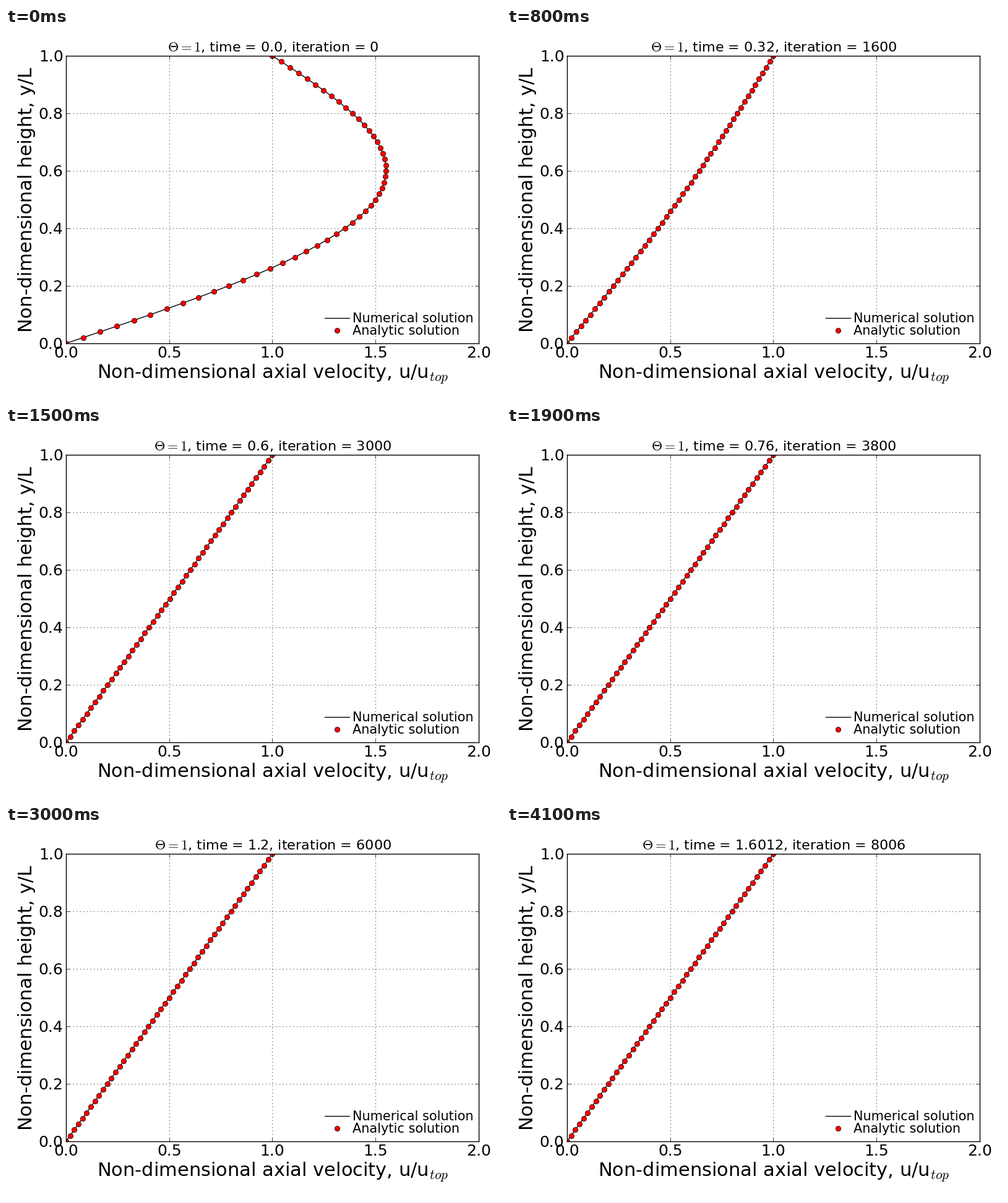
Animation, 800 px wide and 600 px high, one loop 4200 ms. Source, as a matplotlib script:

```python
import numpy as np
import matplotlib.pyplot as plt
from matplotlib.animation import FuncAnimation
from matplotlib.transforms import IdentityTransform

W, H, DPI = 800, 600, 100
LEFT, RIGHT, TOP, BOTTOM = 96.9, 764, 45, 510
MID_X, MID_Y = (LEFT + RIGHT) / 2, (TOP + BOTTOM) / 2
FRAMES, INTERVAL = 42, 100
STEPS_PER_FRAME, LAST_STEP, DT = 200, 8006, 2e-4

plt.style.use("classic")
plt.rcParams.update({
    "font.family": "DejaVu Sans",
    "mathtext.fontset": "cm",
    "figure.facecolor": "white",
    "savefig.facecolor": "white",
    "savefig.dpi": DPI,
})

fig = plt.figure(figsize=(W / DPI, H / DPI), dpi=DPI)
ax = fig.add_axes([LEFT / W, 1 - BOTTOM / H,
                   (RIGHT - LEFT) / W, (BOTTOM - TOP) / H])


def label(x, y, text, size, ha="center", **kw):
    """Put text with its baseline at pixel (x, y), measured from the top left."""
    return fig.text(x, H - y, text, fontsize=size, ha=ha, va="baseline",
                    transform=IdentityTransform(), **kw)


def key(xs, y, **style):
    """Draw a legend handle at pixel height y."""
    fig.add_artist(plt.Line2D(xs, [H - y] * len(xs),
                              transform=IdentityTransform(), **style))


# Axes, grid and tick labels
xticks = np.linspace(0, 2, 5)
yticks = np.linspace(0, 1, 6)
ax.set(xlim=(0, 2), ylim=(0, 1), xticks=xticks, yticks=yticks)
ax.tick_params(labelbottom=False, labelleft=False)
ax.grid(True)
for v in xticks:
    label(LEFT + v / 2 * (RIGHT - LEFT) + 0.1, 533, f"{v:.1f}", 18)
for v in yticks:
    label(92.6, BOTTOM - v * (BOTTOM - TOP) + 9, f"{v:.1f}", 18, ha="right")

label(MID_X + 1, 566, "Non-dimensional axial velocity, u/u$_{top}$", 22)
label(42, MID_Y, "Non-dimensional height, y/L", 22,
      rotation=90, rotation_mode="anchor")
title = label(MID_X + 1, 38, "", 16)

# Legend
line_style = dict(color="k", linestyle="-")
dot_style = dict(color="r", marker="o", linestyle="none")
key([515, 555], 469, **line_style)
key([535], 489.3, **dot_style)
label(560, 476, "Numerical solution", 15, ha="left")
label(560, 496, "Analytic solution", 15, ha="left")

# Couette flow relaxing from a sine disturbance
height = np.linspace(0, 1, 51)
numeric, = ax.plot([], [], **line_style)
analytic, = ax.plot([], [], **dot_style)


def velocity(t):
    return height + np.sin(np.pi * height) * np.exp(-np.pi ** 2 * t)


def update(i):
    step = LAST_STEP if i == FRAMES - 1 else i * STEPS_PER_FRAME
    t = round(step * DT, 4)
    u = velocity(t)
    numeric.set_data(u, height)
    analytic.set_data(u, height)
    title.set_text(rf"$\Theta=1$, time = {t}, iteration = {step}")
    return numeric, analytic, title


anim = FuncAnimation(fig, update, frames=FRAMES, interval=INTERVAL,
                     repeat=True, repeat_delay=0)
plt.show()
```
